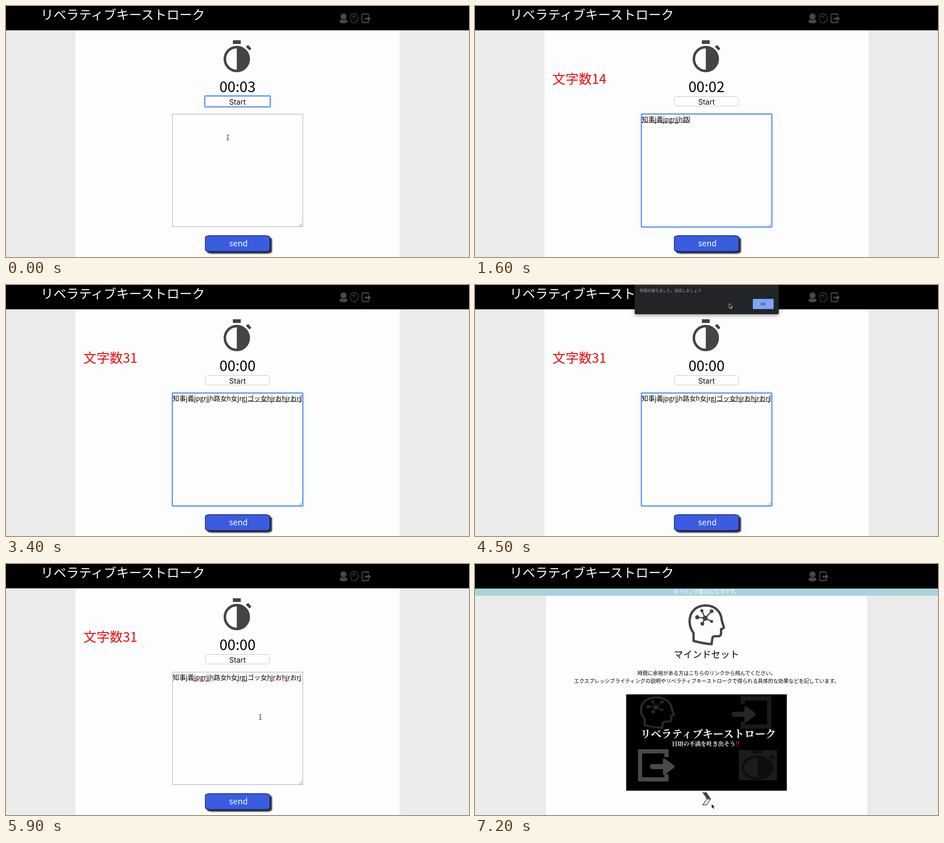
Recreate the animation shown at these times as an HTML page. Size 1000x542 px, loop 7.3 s.

```html
<!DOCTYPE html>
<html lang="ja">
<head>
<meta charset="utf-8">
<style>
html, body { margin: 0; width: 100%; height: 100%; overflow: hidden; background: #ebebeb; }
svg { display: block; width: 100%; height: 100%; font-family: "Noto Sans CJK JP", "Noto Sans CJK", sans-serif; }
.ui { font-family: Inter, sans-serif; }
.banner { font-family: "Noto Serif CJK JP", "Noto Sans CJK JP", serif; font-weight: 900; }
#send.idle { filter: drop-shadow(4px 4px 1.2px #333); }
#dialog { filter: drop-shadow(0 2px 4px rgba(0, 0, 0, .45)); }
</style>
</head>
<body>
<svg id="stage" viewBox="0 0 1000 542" preserveAspectRatio="none"></svg>
<script>
const LOOP = 7300, STEP = 100;
const AT = { focus: 200, type: 400, tick: 1200, alert: 4200, close: 5100, result: 6600 };
const NAME = 'リベラティブキーストローク';
const TYPED = '知事j義jpgrjjh路女h女jrgjゴッ女hjrおhjrおrj';
const COMMITTED = 19;
const INK = '#444', PAPER = '#fdfdfd', SIDE = '#ebebeb';
const BLUE = '#3a5ce0', NAVY = '#000b66';

const text = (x, y, size, str, fill = '#000', extra = '') =>
  `<text x="${x}" y="${y}" font-size="${size}" fill="${fill}" ${extra}>${str}</text>`;
const mid = 'text-anchor="middle"';
const rect = (x, y, w, h, fill, extra = '') =>
  `<rect x="${x}" y="${y}" width="${w}" height="${h}" fill="${fill}" ${extra}/>`;
const place = (x, y, sx, sy, body) =>
  `<g transform="translate(${x} ${y}) scale(${sx} ${sy})">${body}</g>`;

// Icons, each drawn from its own top left corner
const user = c => `<g fill="${c}"><circle cx="9" cy="7" r="6.6"/>
  <path d="M0 19Q1 14 5 13.6Q9 16 13 13.6Q17 14 18 19Q14 22 9 22T0 19Z"/></g>`;

const nodes = [[19, 28, 4.5], [30, 42, 4], [50, 37, 3.2], [29, 14, 3.4], [50, 15, 4]];
const head = c => `<g stroke="${c}" fill="none" stroke-width="5" stroke-linejoin="round">
  <path d="M11 79V62C5 54 2.5 46 2.5 37C2.5 16 17 2.5 37 2.5C57 2.5 71 16 72 35L76.3 49Q77 52.5 70.5 53.5V62Q70.5 69 64 69H57Q52 69 51.5 74L50 86Q32 85 11 79Z"/>
  <g stroke-width="2.6">${nodes.map(n => `<path d="M36 30L${n[0]} ${n[1]}"/>`).join('')}</g>
  <g fill="${c}" stroke="none"><circle cx="36" cy="30" r="5.5"/>
  ${nodes.map(([x, y, r]) => `<circle cx="${x}" cy="${y}" r="${r}"/>`).join('')}</g></g>`;

const frame = c => `<path d="M61.5 17V4.5H4.5V65H61.5V54" fill="none" stroke="${c}" stroke-width="9"/>`;
const arrow = c => `<path d="M30 32H54V22Q55 18 59 21L78 35Q80 37.5 78 40L59 54Q55 57 54 53V43H30Q26 42 26 37.5T30 32Z" fill="${c}"/>`;
const door = c => `<path d="M62 16V12Q62 4 54 4H13Q4 4 4 13V57Q4 66 13 66H54Q62 66 62 58V55" fill="none" stroke="${c}" stroke-width="8"/>` + arrow(c);

const watch = c => `<g fill="${c}"><path d="M20 0H37V8H20ZM53 10L60 18L56 22L48 14Z"/>
  <circle cx="28.5" cy="40.5" r="25.8" fill="none" stroke="${c}" stroke-width="5.4"/>
  <path d="M28.5 15A25.5 25.5 0 0 1 28.5 66Z"/></g>`;

const headerIcons = withHead => place(720, 15.5, 1, 1, user('#484848')) +
  (withHead ? place(743, 15.5, .24, .245, head('#484848')) : '') +
  place(withHead ? 768 : 743.5, 16, .25, .3, door('#484848'));

const form = rect(0, 0, 1000, 542, SIDE) + rect(150, 52, 700, 490, PAPER) +
  rect(0, 0, 1000, 52.5, '#000') + text(75, 28.5, 27.5, NAME, '#fff') + headerIcons(true) +
  place(470, 74, 1, 1, watch(INK)) +
  text(167, 167.5, 28.4, '', '#ee0c0c', 'id="count"') +
  text(500, 185.5, 31.3, '', '#000', `id="timer" ${mid}`) +
  rect(430.5, 195.5, 139, 20.5, PAPER, 'rx="5.5" stroke="#c4c4c4"') +
  rect(429, 194, 142, 24, 'none', 'id="startRing" rx="2" stroke="#5c97f6" stroke-width="2.4"') +
  text(500, 213, 16, 'Start', '#111', `class="ui" ${mid}`) +
  rect(359.5, 233.5, 281.5, 243, PAPER, 'stroke="#a6a6a6"') +
  '<path d="M633 475.5L639.5 469M636.5 475.5L639.5 472.5" stroke="#777"/>' +
  rect(359.2, 233.2, 282, 244, 'none', 'id="areaRing" rx="1.5" stroke="#4f8ef0" stroke-width="2.4"') +
  text(360, 249.8, 14.15, '', '#000', 'id="typed"') +
  '<path id="under" stroke="#111" fill="none"/><path id="caret" stroke="#111" fill="none"/>' +
  '<path id="spell" stroke="#e33" stroke-width="1.4" stroke-dasharray="1.8 1" fill="none"/>' +
  `<g id="send">${rect(430.5, 495.7, 139.5, 34.6, BLUE, `id="sendBox" rx="12" ry="4" stroke="${NAVY}" stroke-width="1.5" stroke-dasharray="2 .5"`)}</g>` +
  text(502, 519, 17.8, 'send', '#fff', `id="sendText" ${mid}`);

const banner = rect(326.5, 281.5, 347, 208, '#000') +
  place(356, 286, .96, .79, head('#2a2a2a')) +
  place(640, 286, -1, 1, frame('#1a1a1a')) + place(529, 287, .98, 1, arrow('#262626')) +
  place(352, 400, 1, 1, frame('#4a4a4a') + arrow('#4a4a4a')) +
  rect(570, 402, 82, 65, '#1c1c1c') +
  place(575, 402, 1.23, .93, watch('#0e0e11')) +
  text(357, 375, 22.9, NAME, '#fff', 'class="banner"') +
  text(425, 392.5, 12.5, '日頃の不満を吐き出そう<tspan fill="#d8141c">‼</tspan>', '#fff', 'class="banner"');

const result = `<g id="result">` + rect(0, 53, 1000, 489, SIDE) + rect(153, 68.5, 694, 473.5, PAPER) +
  rect(0, 52, 1000, 1, '#000') + rect(715, 8, 85, 40, '#000') + headerIcons(false) +
  rect(0, 53, 1000, 15.5, '#a8d2e2') + text(500, 64.2, 10.95, 'タイピング数は32文字です。', '#fff', mid) +
  place(461, 87, 1, 1, head(INK)) +
  text(500, 202.5, 20.2, 'マインドセット', '#000', mid) +
  text(500.3, 240.2, 11.1, '時間に余裕がある方はこちらのリンクから飛んでください。', '#000', mid) +
  text(500.3, 256.8, 11.1, `エクスプレッシブライティングの説明や${NAME}で得られる具体的な効果などを記しています。`, '#000', mid) +
  banner +
  `<path d="M491 493H500L509.5 507H500.5Z" fill="${INK}"/>
  <path d="M500.8 507.5H508.5L500 520.3H492.2Z" fill="none" stroke="${INK}" stroke-width="1.5"/></g>`;

const dialog = '<g id="dialog"><path d="M345 0H656V61Q656 63 654 63H347Q345 63 345 61Z" fill="#232428"/>' +
  text(356, 15.4, 8.3, '時間が経ちました。送信しましょう', '#9da1a7') +
  rect(600, 30, 45, 22, '#7ba5f5', 'rx="2.5"') +
  text(622.3, 43.8, 8, 'OK', '#1c1f28', `class="ui" ${mid}`) + '</g>';

const pointers = `<path id="arrow" d="M0 0V10L2.4 7.9L4 11.6L6 10.7L4.4 7.2H7.2Z" fill="#000" stroke="#fff" stroke-width=".9"/>
  <path id="beam" d="M-2.6 -5.5Q0 -5.5 0 -4Q0 -5.5 2.6 -5.5M0 -4V4M-2.6 5.5Q0 5.5 0 4Q0 5.5 2.6 5.5M-1.5 1.5H1.5" fill="none" stroke="#333" stroke-width="1.1"/>`;

document.getElementById('stage').innerHTML = form + result + dialog + pointers;
const el = Object.fromEntries([...document.querySelectorAll('[id]')].map(e => [e.id, e]));

// Keys: time, then values
const typing = [[AT.type - 100, 0], [1550, 12], [1650, 12], [3300, 32]];
const mouse = [[0, 479, 284], [AT.alert, 479, 284], [4500, 549, 40], [4800, 617, 41],
  [5000, 617, 41], [5300, 608, 41], [5500, 608, 41], [6200, 511, 518]];
const ease = p => p * p * (3 - 2 * p);

function sample(keys, t, curve = p => p) {
  if (t <= keys[0][0]) return keys[0].slice(1);
  const i = keys.findIndex(k => k[0] > t);
  if (i < 0) return keys[keys.length - 1].slice(1);
  const a = keys[i - 1], b = keys[i], p = curve((t - a[0]) / (b[0] - a[0]));
  return a.slice(1).map((v, j) => v + (b[j + 1] - v) * p);
}

const show = (e, on) => e.setAttribute('visibility', on ? 'visible' : 'hidden');
const put = (e, str) => { if (e.textContent !== str) e.textContent = str; };
const xAt = n => 360 + (n ? el.typed.getSubStringLength(0, n) : 0);

function drawTyping(t) {
  const n = Math.floor(sample(typing, t)[0] + 1e-6);
  const focused = t >= AT.focus && t < AT.close;
  put(el.typed, TYPED.slice(0, n));
  const count = n <= 12 ? n * 14 / 12 : 14 + (n - 12) * 17 / 20;
  put(el.count, n ? '文字数' + Math.round(count) : '');
  const end = xAt(n), from = xAt(n > COMMITTED ? COMMITTED : 0);
  el.under.setAttribute('d', focused && n ? `M${from} 251.7H${end}` : '');
  el.caret.setAttribute('d', focused ? `M${end + .5} 237.5V251.5` : '');
  const marks = t >= AT.close ? [...TYPED.matchAll(/[a-z]{2,}/g)] : [];
  el.spell.setAttribute('d', marks.map(m => `M${xAt(m.index)} 252H${xAt(m.index + m[0].length)}`).join(''));
  show(el.areaRing, focused);
  show(el.startRing, t < AT.focus);
}

function drawMouse(t) {
  const [x, y] = sample(mouse, t, ease);
  const alerting = t >= AT.alert && t < AT.close;
  const inArea = x > 359 && x < 641 && y > 233 && y < 477 && !alerting;
  const awake = t < AT.type || t >= AT.alert;
  const hover = y > 495;
  for (const e of [el.arrow, el.beam]) e.setAttribute('transform', `translate(${x} ${y})`);
  show(el.arrow, awake && !inArea);
  show(el.beam, awake && inArea);
  show(el.dialog, alerting);
  el.send.setAttribute('class', hover ? '' : 'idle');
  el.sendBox.setAttribute('fill', hover ? PAPER : BLUE);
  el.sendText.setAttribute('fill', hover ? NAVY : '#fff');
}

function draw(t) {
  const ticks = t < AT.tick ? 0 : Math.floor((t - AT.tick) / 1000) + 1;
  put(el.timer, '00:0' + Math.max(0, 3 - ticks));
  drawTyping(t);
  drawMouse(t);
  show(el.result, t >= AT.result);
}

const t0 = performance.now();
function tick() {
  const t = (performance.now() - t0) % LOOP;
  draw(Math.floor(t / STEP) * STEP);
  requestAnimationFrame(tick);
}
tick();
</script>
</body>
</html>
```
